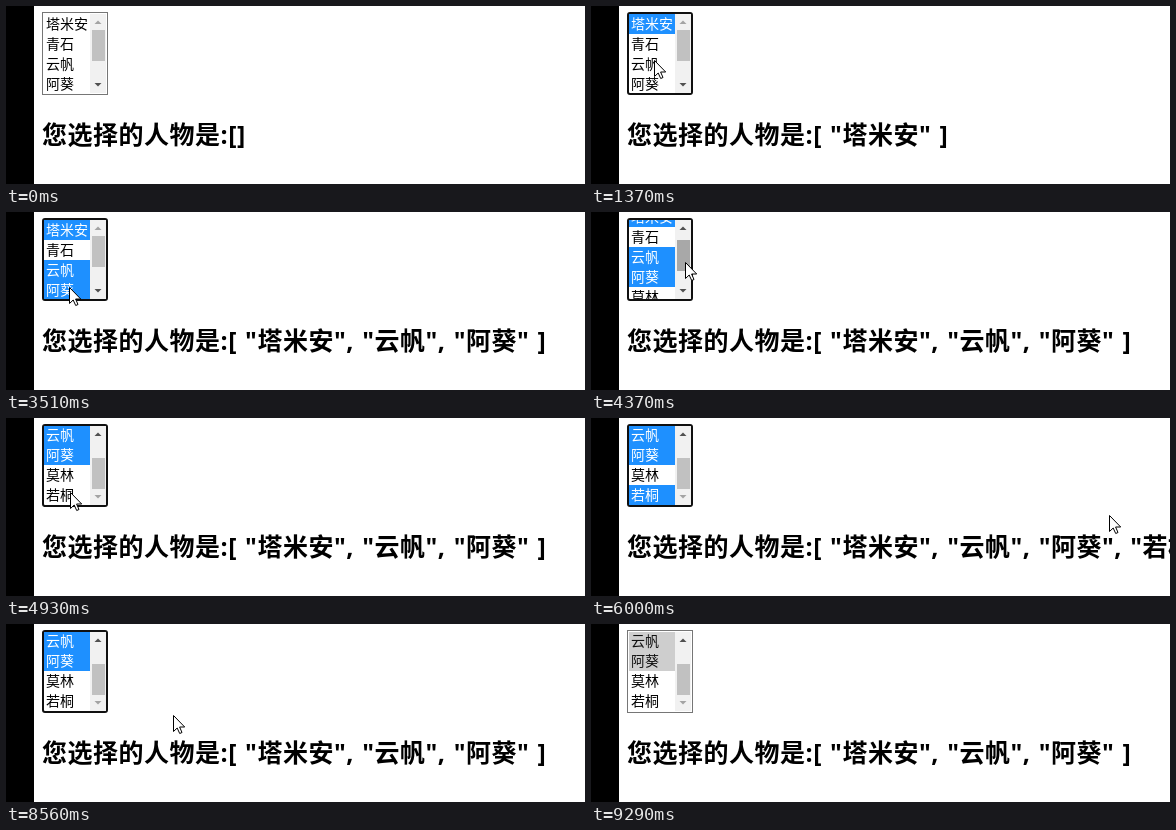
Recreate the animation shown at these times as an HTML page. Size 579x178 px, loop 9360 ms.

```html
<!DOCTYPE html>
<html lang="zh-CN">
<head>
<meta charset="utf-8">
<style>
html, body { margin: 0; width: 100%; height: 100%; overflow: hidden; background: #fff; }
#stage { position: relative; width: 579px; height: 178px; overflow: hidden; background: #fff; color: #000;
  font-family: "Open Sans", "Noto Sans CJK SC", "Noto Sans CJK", sans-serif; }
#stage div, #stage svg { position: absolute; }
#bar { left: 0; top: 0; width: 28px; height: 178px; background: #000; }
#box { left: 36px; top: 6px; width: 66px; height: 83px; box-sizing: border-box; border: 1px solid #767676; }
#box.focus { border: 2px solid #101010; border-radius: 3px; }
#view { left: 38px; top: 8px; width: 46px; height: 79px; overflow: hidden; }
#list { left: 0; top: 0; width: 46px; }
#list .opt { position: relative; height: 20px; padding-left: 2px; font-size: 14px; line-height: 20px; white-space: nowrap; }
.on { background: #cecece; color: #101010; }
.focus ~ #view .on { background: #1e90ff; color: #fff; }
#track { left: 84px; top: 8px; width: 16px; height: 79px; background: #f1f1f1; }
#thumb { left: 2px; top: 16px; width: 13px; height: 31px; background: #c1c1c1; }
#thumb.hot { background: #a8a8a8; }
#track svg { left: 0; top: 0; }
#title { left: 36px; top: 110px; font-size: 25px; font-weight: 700; line-height: 36px; white-space: pre;
  letter-spacing: .5px; word-spacing: 1.2px; }
#cursor { left: 0; top: 0; }
</style>
</head>
<body>
<div id="stage">
  <div id="bar"></div>
  <div id="box"></div>
  <div id="view"><div id="list"></div></div>
  <div id="track">
    <div id="thumb"></div>
    <svg width="16" height="79">
      <path id="up" d="M4.5 10l3.5-3.5 3.5 3.5z"/>
      <path id="down" d="M4.5 69l3.5 3.5 3.5-3.5z"/>
    </svg>
  </div>
  <div id="title"></div>
  <svg id="cursor" width="14" height="21">
    <path d="M.5 .5V16.5L4.2 13 6.7 18.5 9 17.5 6.6 12H11.7Z" fill="#fff" stroke="#000"/>
  </svg>
</div>
<script>
const LOOP = 9360, STEP = 66, LAG = 70;
const FOCUS = 940, BLUR = 9290, SCROLL = 4370, LEAVE = 8930;
const MAX_SCROLL = 41, THUMB_TRAVEL = 16;
const $ = id => document.getElementById(id);

const people = [
  { name: "塔米安", on: FOCUS },
  { name: "青石" },
  { name: "云帆", on: 2630 },
  { name: "阿葵", on: 3180 },
  { name: "莫林" },
  { name: "若桐", on: 5260, off: 8160 }
];

// Where the mouse heads for, and when it sets off
const stops = [
  { t: 400, x: 48, y: 15 },
  { t: FOCUS, x: 63, y: 54 },
  { t: 2300, x: 62, y: 58 },
  { t: 3250, x: 63, y: 76 },
  { t: 3790, x: 94, y: 45 },
  { t: SCROLL, x: 94, y: 61 },
  { t: 4650, x: 64, y: 74 },
  { t: 5590, x: 518, y: 97 },
  { t: 6680, x: 63, y: 78 },
  { t: 8560, x: 532, y: 136 }
];
const entry = { x: 206, y: 105 };

const between = (t, a, b = Infinity) => t >= a && t < b;
const mix = (a, b, u) => a + (b - a) * u;

// Ease-out progress in discrete steps, the first taken at once
function glide(t, start, count = 5) {
  const k = Math.floor((t - start) / STEP) + 1;
  return Math.sin(Math.PI / 2 * Math.max(0, Math.min(1, k / count)));
}

function cursorAt(t) {
  const i = stops.findLastIndex(s => t >= s.t);
  if (i < 0 || t >= LEAVE) return null;
  const to = stops[i], from = stops[i - 1] || entry;
  const far = Math.hypot(to.x - from.x, to.y - from.y);
  const u = glide(t, to.t, 5 + Math.floor(far / 200));
  return { x: Math.round(mix(from.x, to.x, u)), y: Math.round(mix(from.y, to.y, u)) };
}

for (const p of people) {
  p.el = document.createElement("div");
  p.el.className = "opt";
  p.el.textContent = p.name;
  $("list").append(p.el);
}

const chosen = (p, t) => between(t, p.on, p.off);

function draw(t) {
  $("box").className = between(t, FOCUS, BLUR) ? "focus" : "";
  people.forEach(p => p.el.classList.toggle("on", chosen(p, t)));

  const shown = people.filter(p => chosen(p, t - LAG)).map(p => `"${p.name}"`);
  $("title").textContent = "您选择的人物是:[" + (shown.length ? ` ${shown.join(", ")} ` : "") + "]";

  const u = glide(t, SCROLL);
  $("list").style.top = -Math.round(MAX_SCROLL * u) + "px";
  $("thumb").style.top = 16 + Math.floor(THUMB_TRAVEL * u) + "px";
  $("up").setAttribute("fill", u > 0 ? "#505050" : "#a3a3a3");
  $("down").setAttribute("fill", u < 1 ? "#505050" : "#a3a3a3");

  const mouse = cursorAt(t);
  const overThumb = mouse && t > 3790 && between(mouse.x, 86, 99);
  $("thumb").className = overThumb ? "hot" : "";
  $("cursor").style.display = mouse ? "" : "none";
  if (mouse) $("cursor").style.transform = `translate(${mouse.x}px, ${mouse.y}px)`;
}

const begin = performance.now();
function tick() {
  draw((performance.now() - begin) % LOOP);
  requestAnimationFrame(tick);
}
draw(0);
requestAnimationFrame(tick);
</script>
</body>
</html>
```
